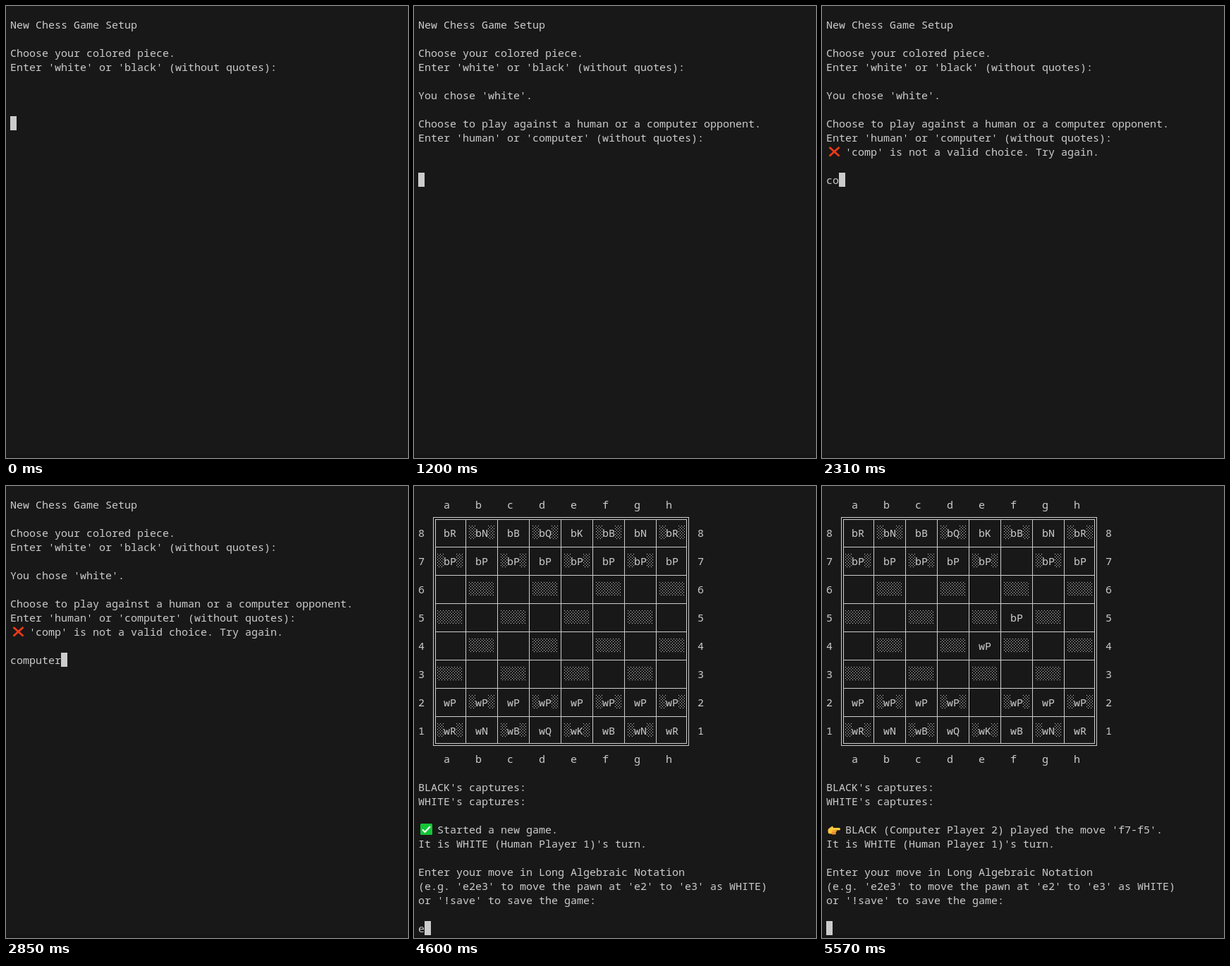
Recreate the animation shown at these times as an HTML page with a canvas. Size 570 by 640 pixels, loop 8000 ms.

```html
<!DOCTYPE html>
<html lang="en">
<head>
<meta charset="utf-8">
<title>Terminal chess</title>
<style>
html, body { margin: 0; width: 100%; height: 100%; overflow: hidden; background: #181818; }
canvas { display: block; }
</style>
</head>
<body>
<canvas id="stage" width="570" height="640"></canvas>
<script>
const ctx = document.getElementById('stage').getContext('2d');
const FG = '#cccccc', BG = '#181818', LOOP = 8000;
const CELL_W = 9, CELL_H = 20;
const colX = c => 6 + c * CELL_W;
const rowY = r => 16 + r * CELL_H;

const intro = [
  'New Chess Game Setup', '', 'Choose your colored piece.',
  "Enter 'white' or 'black' (without quotes):"
];
const opponent = [
  ...intro, '', "You chose 'white'.", '',
  'Choose to play against a human or a computer opponent.',
  "Enter 'human' or 'computer' (without quotes):"
];
const invalid = word => `   '${word}' is not a valid choice. Try again.`;
const turn = [
  "It is WHITE (Human Player 1)'s turn.", '',
  'Enter your move in Long Algebraic Notation',
  "(e.g. 'e2e3' to move the pawn at 'e2' to 'e3' as WHITE)",
  "or '!save' to save the game:"
];

const back = [...'RNBQKBNR'];
const empty = () => Array(8).fill('');
const start = [
  back.map(p => 'b' + p), Array(8).fill('bP'),
  empty(), empty(), empty(), empty(),
  Array(8).fill('wP'), back.map(p => 'w' + p)
];
const moved = start.map(rank => [...rank]);
moved[1][5] = moved[6][4] = '';
moved[3][5] = 'bP';
moved[4][4] = 'wP';

const screens = {
  color: { lines: intro, input: 7 },
  colorError: { lines: [...intro, invalid('wh')], input: 7, icon: cross, iconRow: 4 },
  rival: { lines: opponent, input: 11 },
  rivalError: { lines: [...opponent, invalid('comp')], input: 11, icon: cross, iconRow: 9 },
  opening: game(start, 'Started a new game.', check),
  reply: game(moved, "BLACK (Computer Player 2) played the move 'f7-f5'.", hand)
};

// [time in ms, screen, typed text, rows the cursor has dropped]
const steps = [
  [0, 'color', ''], [500, 'color', 'w'], [575, 'color', '', 1],
  [650, 'colorError', ''], [930, 'colorError', 'w'],
  [1020, 'colorError', 'whi'], [1110, 'colorError', 'white'],
  [1200, 'rival', ''], [1760, 'rival', 'c'], [1850, 'rival', 'com'], [1940, 'rival', 'comp'],
  [2030, 'rivalError', ''], [2310, 'rivalError', 'co'], [2400, 'rivalError', 'comp'],
  [2580, 'rivalError', 'compu'], [2670, 'rivalError', 'comput'],
  [2760, 'rivalError', 'compute'], [2850, 'rivalError', 'computer'],
  [2940, 'opening', ''], [4600, 'opening', 'e'], [4770, 'opening', 'e2'],
  [5020, 'opening', 'e2e'], [5200, 'opening', 'e2e4'], [5570, 'reply', '']
];

function game(board, message, icon) {
  const lines = Array(20).fill('');
  lines.push("BLACK's captures:", "WHITE's captures:", '', '   ' + message, ...turn);
  return { lines, board, input: 30, icon, iconRow: 23 };
}

function rect(x, y, w, h, color = FG) {
  ctx.fillStyle = color;
  ctx.fillRect(x, y, w, h);
}

function text(str, col, row) {
  ctx.fillStyle = FG;
  ctx.fillText(str, colX(col), rowY(row) + 16);
}

function line(points, color, width) {
  ctx.strokeStyle = color;
  ctx.lineWidth = width;
  ctx.beginPath();
  points.forEach(([x, y]) => ctx.lineTo(x, y));
  ctx.stroke();
}

function pill(x, y, w, h, r, color) {
  ctx.fillStyle = color;
  ctx.beginPath();
  ctx.roundRect(x, y, w, h, r);
  ctx.fill();
}

function cross(y) {
  line([[10.5, y + 4], [24.5, y + 16.5]], '#f03a17', 2.8);
  line([[24.5, y + 4], [10.5, y + 16.5]], '#f03a17', 2.8);
}

function check(y) {
  pill(9, y + 2, 17, 16, 1.5, '#13c636');
  line([[12, y + 10.5], [15.5, y + 14], [23, y + 6]], '#ffffff', 2.2);
}

function hand(y) {
  pill(8.5, y + 8.5, 10, 8, 3, '#ffc83d');
  pill(13, y + 8, 13, 3.4, 1.7, '#ffc83d');
  line([[11, y + 9.5], [15.5, y + 6.5]], '#ffc83d', 2.6);
  pill(14, y + 11.2, 7, 2.8, 1.4, '#f2a52b');
  pill(13.5, y + 14, 6.5, 3.4, 1.4, '#e8912d');
}

function shade(col, row, cols) {
  ctx.fillStyle = FG;
  const x = colX(col), y = rowY(row);
  for (let dy = 0; dy < CELL_H; dy += 2)
    for (let dx = dy % 4; dx < cols * CELL_W; dx += 4)
      ctx.fillRect(x + dx, y + dy, 1, 1);
}

function drawBoard(board) {
  ctx.strokeStyle = FG;
  ctx.lineWidth = 1;
  ctx.strokeRect(27.5, 44.5, 362, 323);
  ctx.strokeRect(30.5, 47.5, 356, 317);
  for (let i = 1; i < 8; i++) {
    rect(28 + i * 45, 47, 1, 318);
    rect(30, 46 + i * 40, 357, 1);
  }
  board.forEach((rank, r) => {
    const row = 2 + r * 2;
    text(8 - r, 0, row);
    text(8 - r, 44, row);
    text('abcdefgh'[r], 4 + r * 5, 0);
    text('abcdefgh'[r], 4 + r * 5, 18);
    rank.forEach((piece, f) => {
      const col = 3 + f * 5;
      if ((r + f) % 2) {
        if (piece) {
          shade(col, row, 1);
          shade(col + 3, row, 1);
        } else shade(col, row, 4);
      }
      text(piece, col + 1, row);
    });
  });
}

function frame(now) {
  const t = now % LOOP;
  const [, name, typed, drop = 0] = steps.findLast(s => s[0] <= t);
  const { lines, board, input, icon, iconRow } = screens[name];
  rect(0, 0, 570, 640, BG);
  rect(0, 636, 570, 4, '#151515');
  ctx.font = '15px "Noto Sans Mono", "DejaVu Sans Mono", monospace';
  lines.forEach((str, row) => text(str, 0, row));
  if (board) drawBoard(board);
  if (icon) icon(rowY(iconRow));
  text(typed, 0, input);
  rect(colX(typed.length), rowY(input + drop), CELL_W, CELL_H);
  requestAnimationFrame(frame);
}
frame(0);
</script>
</body>
</html>
```
